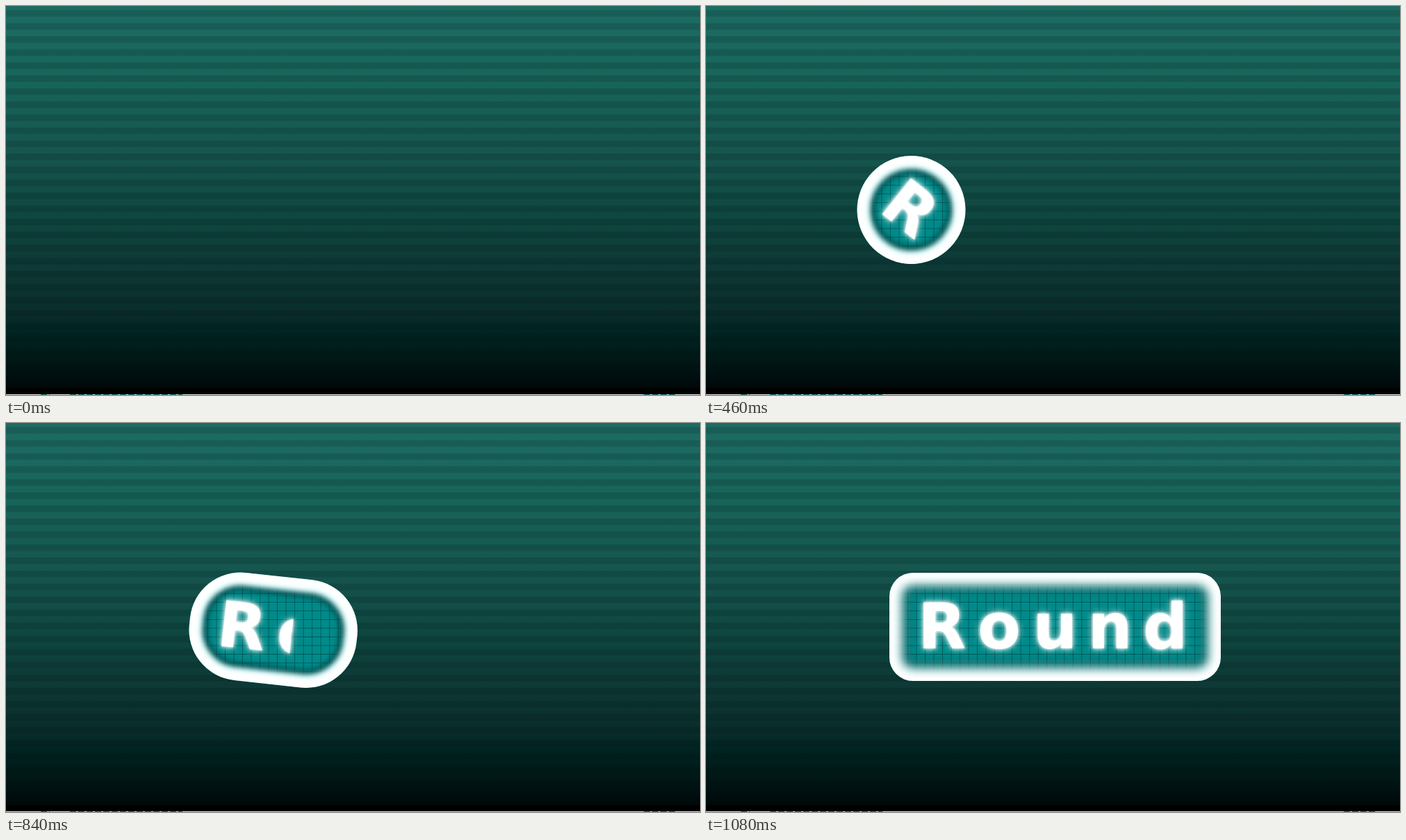
Write an HTML page without scripts that moves like this. It is 999 px wide and 561 px high and loops after 2.08 s.

```html
<!DOCTYPE html>
<html lang="en">
<head>
<meta charset="utf-8">
<title>Round</title>
<style>
  html, body { margin: 0; width: 100%; height: 100%; overflow: hidden; background: #000; }
  svg { display: block; width: 100vw; height: 100vh; }

  .pose, .box, .reveal, .rim { animation: 2080ms step-end infinite; }
  .pose { animation-name: pose; }
  .box { x: -78px; y: -78px; width: 156px; height: 156px; rx: 78px; animation-name: grow; }
  .box.pose { animation-name: pose, grow; }
  .reveal { animation-name: reveal; }
  .rim { fill: none; animation-name: soften; }
  .glow { filter: drop-shadow(0 0 2px #fff) drop-shadow(0 0 5px #fffc); }
  text { font: bold 90px "DejaVu Sans", sans-serif; fill: #fff; }

  /* roll in, spin past upright, settle; then tip over while growing */
  @keyframes pose {
    0%     { transform: translate(-120px, 294px) rotate(0deg); }
    7.69%  { transform: translate(-44px, 294px) rotate(122deg); animation-timing-function: steps(2); }
    11.05% { transform: translate(39.5px, 294px) rotate(192deg); animation-timing-function: steps(2); }
    15.86% { transform: translate(159.5px, 294px) rotate(291deg); animation-timing-function: steps(3); }
    22.11% { transform: translate(295.5px, 294px) rotate(398.5deg); }
    24.51% { transform: translate(328px, 294px) rotate(408deg); animation-timing-function: steps(2); }
    28.84% { transform: translate(341px, 294px) rotate(370deg); }
    30.76% { transform: translate(342px, 294px) rotate(360deg); }
    37.98% { transform: translate(342px, 294px) rotate(361deg); animation-timing-function: steps(2); }
    42.78% { transform: translate(342px, 294px) rotate(371.5deg); }
    44.71% { transform: translate(342px, 294px) rotate(367deg); }
    47.11% { transform: translate(342px, 294px) rotate(362.5deg); }
    49.51% { transform: translate(342px, 294px) rotate(360.6deg); }
    51.92%, 100% { transform: translate(342px, 294px) rotate(360deg); }
  }
  @keyframes grow {
    0%     { width: 156px; rx: 78px; }
    37.98% { width: 164px; rx: 78px; animation-timing-function: steps(2); }
    42.78% { width: 320px; rx: 68px; }
    44.71% { width: 400px; rx: 42px; }
    47.11% { width: 494px; rx: 34px; }
    49.51% { width: 484px; rx: 34px; }
    51.92%, 100% { width: 477px; rx: 34px; }
  }
  @keyframes reveal {
    0%     { width: 90px; }
    37.98% { width: 90px; animation-timing-function: steps(2); }
    42.78% { width: 146px; }
    44.71% { width: 225px; }
    47.11% { width: 315px; }
    49.51% { width: 375px; }
    51.92%, 100% { width: 410px; }
  }
  @keyframes soften {
    0%     { filter: blur(3.5px); }
    42.78% { filter: blur(3.5px); }
    44.71% { filter: blur(5px); }
    47.11% { filter: blur(6px); }
    51.92%, 100% { filter: blur(7px); }
  }
</style>
</head>
<body>
<svg viewBox="0 0 999 561" preserveAspectRatio="none" role="img" aria-label="Round">
  <defs>
    <linearGradient id="sea" x2="0" y2="1">
      <stop offset="0" stop-color="#1d6c64"/>
      <stop offset=".2" stop-color="#17645a"/>
      <stop offset=".4" stop-color="#15544d"/>
      <stop offset=".55" stop-color="#0e463f"/>
      <stop offset=".68" stop-color="#0e3835"/>
      <stop offset=".8" stop-color="#082c2a"/>
      <stop offset=".84" stop-color="#002422"/>
      <stop offset=".91" stop-color="#001816"/>
      <stop offset=".95" stop-color="#000f10"/>
      <stop offset=".98" stop-color="#000908"/>
    </linearGradient>
    <pattern id="stripes" y="6" width="999" height="18.8" patternUnits="userSpaceOnUse">
      <rect width="999" height="9.4" fill="#000a0a" opacity=".15"/>
    </pattern>
    <pattern id="grid" x="2" y="7.5" width="12.52" height="12.52" patternUnits="userSpaceOnUse">
      <path d="M.5 0V12.52M0 .5H12.52" stroke="#034848" opacity=".75"/>
    </pattern>
    <clipPath id="badge"><rect class="box pose"/></clipPath>
    <clipPath id="window"><rect class="reveal" x="-48" y="-78" width="90" height="156"/></clipPath>
  </defs>

  <rect width="999" height="561" fill="url(#sea)"/>
  <rect width="999" height="561" fill="url(#stripes)"/>
  <rect y="551" width="999" height="10"/>
  <path d="M0 560.5H999" stroke="#dfe9e9"/>
  <path d="M50 560.5h13m29 0h162m664 0h45" stroke="#2a8480" stroke-dasharray="9 3"/>

  <g clip-path="url(#badge)">
    <rect width="999" height="561" fill="#008b8b"/>
    <rect width="999" height="561" fill="url(#grid)"/>
    <g class="pose">
      <g class="rim">
        <rect class="box" stroke="#033" stroke-opacity=".6" stroke-width="54"/>
        <rect class="box" stroke="#e0ffff" stroke-width="38"/>
        <rect class="box" stroke="#fff" stroke-width="26"/>
      </g>
    </g>
  </g>

  <g class="pose">
    <g class="glow">
      <g clip-path="url(#window)">
        <text x="-37 49 128.5 207.5 287" y="31">Round</text>
      </g>
    </g>
  </g>
</svg>
</body>
</html>
```
